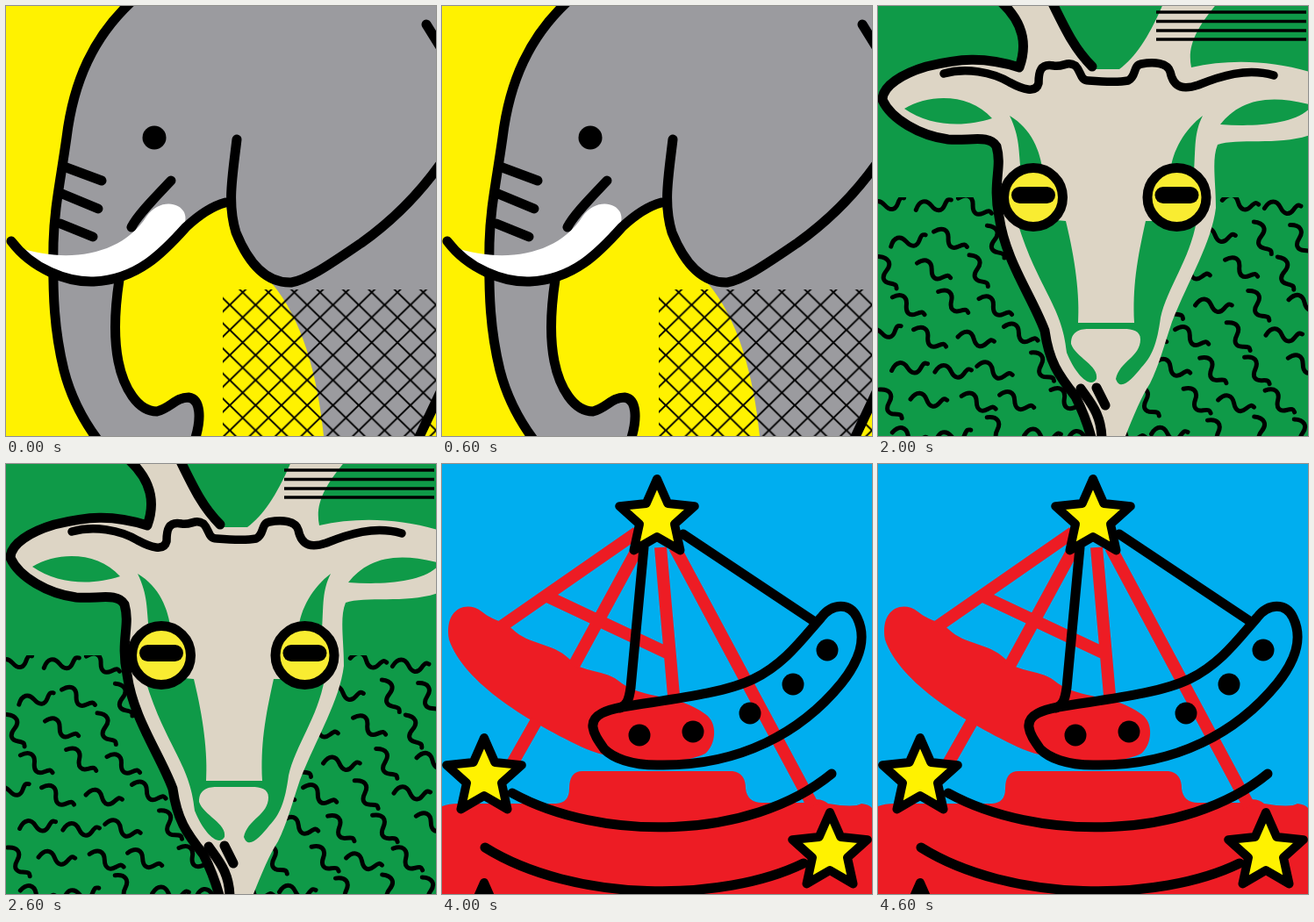
Animation of 490 by 490 pixels, one loop 5000 ms. Source, as an HTML page:

```html
<!DOCTYPE html>
<html lang="en">
<head>
<meta charset="utf-8">
<title>Animal posters</title>
<style>
html, body { margin: 0; width: 100%; height: 100%; overflow: hidden; }
svg { display: block; width: 100vw; height: 100vh; }
.scene { display: none; }
.scene.on { display: inline; }
.line { fill: none; stroke: #000; stroke-width: 11; stroke-linecap: round; stroke-linejoin: round; }
.red { fill: none; stroke: #ed1c24; stroke-width: 14; }
.navy { fill: none; stroke: #134c98; stroke-width: 27; stroke-linecap: round; }
</style>
</head>
<body>
<svg viewBox="0 0 490 490">
<defs>
  <path id="drop" d="M0 0C12 25 55 65 55 99A55 54 0 0 1-55 99C-55 65-12 25 0 0Z"/>
  <pattern id="mesh" x="255" y="312" width="29.4" height="28.6" patternUnits="userSpaceOnUse">
    <path d="M-2-2L31.4 30.6M31.4-2L-2 30.6" stroke="#000" stroke-width="2"/>
  </pattern>
  <pattern id="dots" x="291" y="291" width="17.6" height="17.6" patternUnits="userSpaceOnUse">
    <path d="M2 2h4.6v4.6h-4.6zM10.8 10.8h4.6v4.6h-4.6z"/>
  </pattern>
  <clipPath id="grass"><path d="M0 218H490V490H0Z"/></clipPath>
  <g id="eye">
    <circle r="33.5" fill="#f9ec31" stroke="#000" stroke-width="11"/>
    <rect x="-25" y="-12" width="50" height="19" rx="9.5"/>
  </g>
</defs>

<!-- Elephant -->
<g class="scene">
  <path fill="#fff200" d="M0 0H490V490H0Z"/>
  <path fill="#9b9b9f" d="M143-5C100 35 77 85 69 150C62 200 55 230 54 270C53 330 55 370 66 415C75 450 90 475 105 495H215C222 470 222 448 208 446C195 446 188 458 172 462C150 462 134 435 128 405C122 375 124 345 129 312L205 252C220 238 235 228 250 224C256 255 274 300 302 315C337 355 355 420 362 490H470L495 440V-5Z"/>
  <path fill="url(#mesh)" d="M247 323H490V490H247Z"/>
  <g class="line">
    <path d="M143-5C100 35 77 85 69 150C62 200 55 230 54 270C53 330 55 370 66 415C75 450 90 475 105 495"/>
    <path d="M129 312C124 345 122 375 128 405C134 435 150 462 172 462C188 458 193 446 208 446C222 448 223 470 215 495"/>
    <path d="M188 199C170 218 150 238 143 252M66 183L109 199M64 214L105 231M62 248L99 263"/>
    <path d="M263 152C258 195 252 225 262 258C275 290 295 316 325 315C345 312 375 290 405 270C440 245 470 215 495 180"/>
    <path d="M479 21L497 50M469 495L495 440"/>
  </g>
  <path fill="#fff" d="M14 275C70 294 132 284 160 240C173 221 196 222 203 235C208 247 200 255 190 262C160 295 125 312 90 310C55 305 30 292 14 275Z"/>
  <path class="line" d="M6 268C30 300 70 315 100 314C150 312 180 280 205 252C220 238 235 228 250 224"/>
  <circle cx="169" cy="150" r="13.5"/>
</g>

<!-- Frog -->
<g class="scene">
  <path fill="#bdbcc0" d="M0 0H490V490H0Z"/>
  <path class="line" d="M34-9V26M78-9V69M121-9V112"/>
  <use href="#drop" fill="#fff" transform="translate(361 -8) scale(2.16)"/>
  <use href="#drop" fill="#29a8e0" transform="translate(86 108)"/>
  <use href="#drop" fill="#29a8e0" transform="translate(55 293) scale(2.16)"/>
  <use href="#drop" fill="#00aeef" transform="translate(140 263) scale(.565)"/>
  <path fill="#39b54a" d="M202 250C225 225 260 212 295 212C340 212 380 245 445 255L444 262C437 295 418 318 400 333L372 352C366 360 376 370 386 362L408 345C420 336 427 340 427 352L425 380C427 390 439 390 440 380L439 350C440 334 448 334 456 336L478 343C490 344 492 330 482 328L464 320C435 305 450 280 495 262V495H146C130 465 120 440 124 405C130 375 160 355 190 366C212 375 224 405 218 440L211 474C210 486 225 488 229 478L235 442C238 432 248 432 256 440L278 466C284 474 295 470 293 460L268 430C262 422 262 416 270 412L300 403C310 398 308 386 298 387L270 393C255 396 240 394 228 382C208 360 203 330 207 300C210 280 213 270 206 259Z"/>
  <circle cx="300" cy="301" r="73" fill="url(#dots)"/>
  <path fill="#006838" d="M201 119C215 104 235 108 245 118C255 130 262 132 275 130C295 126 330 126 350 130C365 132 370 125 378 117C390 108 425 108 432 126C405 124 390 142 390 162C392 185 405 198 425 201C438 202 446 196 455 192C458 225 445 242 425 240C380 230 340 198 285 198C240 200 215 222 192 234C178 238 172 215 177 190Q188 196 203 194C230 191 238 175 238 158C238 140 225 124 201 119Z"/>
  <g class="line">
    <path d="M204 114C215 104 235 108 245 118C255 130 262 132 275 130C295 126 330 126 350 130C365 132 370 125 378 117C388 108 400 110 408 111"/>
    <path d="M176 197C172 215 178 238 192 234C215 222 240 200 285 198C340 198 380 230 425 240C445 242 458 225 453 194"/>
    <path d="M444 262C437 295 418 318 400 333L372 352C366 360 376 370 386 362L408 345C420 336 427 340 427 352L425 380C427 390 439 390 440 380L439 350C440 334 448 334 456 336L478 343C490 344 492 330 482 328L464 320C435 305 450 280 495 262"/>
    <path d="M206 259C213 270 210 280 207 300C203 330 208 360 228 382C240 394 255 396 270 393L298 387C308 386 310 398 300 403L270 412C262 416 262 422 268 430L293 460C295 470 284 474 278 466L256 440C248 432 238 432 235 442L229 478C225 488 210 486 211 474L218 440C224 405 212 375 190 366C160 355 130 375 124 405C120 440 130 465 146 495"/>
  </g>
  <ellipse cx="195" cy="155" rx="14" ry="19"/>
  <ellipse cx="434" cy="159" rx="14" ry="18"/>
</g>

<!-- Goat -->
<g class="scene">
  <path fill="#0f9a48" d="M0 0H490V490H0Z"/>
  <g clip-path="url(#grass)"><path id="squiggles" class="line" style="stroke-width:5"/></g>
  <path fill="#ddd5c5" d="M140-5C167 20 170 45 161 70C120 57 92 60 55 69C28 77 5 91 5 107C15 129 48 148 80 152C105 154 127 146 135 160C142 185 130 200 138 240C145 290 175 330 190 370C195 405 205 420 225 450C235 465 240 480 250 495H280C290 470 300 445 310 430C320 410 325 390 335 360C355 310 380 270 385 230C385 200 380 175 387 158C410 150 460 160 495 146V76C450 62 400 60 357 70C352 45 363 25 388-5H326C309 35 294 58 275 72H245C225 50 215 30 198-5Z"/>
  <g fill="#0f9a48">
    <path d="M30 117C60 99 105 100 130 128C100 138 60 138 30 117ZM390 135C410 110 440 98 495 113C480 135 430 138 390 135Z"/>
    <path d="M150 125C175 140 185 165 188 190H163C160 165 162 150 150 125ZM370 125C350 140 335 165 333 190H360C362 160 360 145 370 125Z"/>
    <path d="M157 240L214 245C225 290 230 330 228 361H292C290 320 295 290 305 245L363 245C355 290 330 320 322 355C318 385 312 400 300 412C290 425 276 440 271 425C275 405 299 400 299 380C299 370 290 368 280 368H240C228 368 220 372 220 385C225 400 252 410 249 425C242 437 225 420 215 395C210 340 180 320 157 240Z"/>
  </g>
  <g class="line">
    <path d="M140-5C167 20 170 45 161 70C120 57 92 60 55 69C28 77 5 91 5 107C15 129 48 148 80 152C105 154 127 146 135 160C142 185 130 200 138 240C145 290 175 330 190 370C195 405 205 420 225 445C235 465 240 480 244 495"/>
    <path d="M198-5C215 30 225 50 244 69M231 436C242 452 255 465 255 495M249 435L259 455"/>
    <path style="stroke-width:9.5" d="M75 77C100 70 130 75 150 87C165 95 180 100 183 88C183 75 185 65 200 68C212 70 215 62 225 68C232 75 230 85 240 85C265 87 275 87 285 85C295 80 290 68 300 66C315 63 330 65 333 75C337 95 350 95 365 90C390 80 420 70 451 79"/>
  </g>
  <path d="M317 7H488M317 17.5H488M317 28H488M317 38H488" stroke="#000" stroke-width="3.5"/>
  <use href="#eye" x="177" y="218"/>
  <use href="#eye" x="340.5" y="218"/>
</g>

<!-- Whale -->
<g class="scene">
  <path fill="#fff" d="M0 0H490V490H0Z"/>
  <g id="rings" fill="none" stroke-width="28"></g>
  <g class="navy">
    <path d="M48 305C58 370 100 410 150 411C200 409 242 375 243 330C243 300 225 265 202 252M287 252C265 265 244 300 247 330C255 380 295 409 335 408C380 407 430 375 441 310"/>
    <path d="M76 250C78 290 95 335 116 353M115 240C113 285 130 315 157 330M155 245C155 275 165 295 188 305"/>
    <path d="M336 243C336 270 325 290 315 303M375 228C378 280 362 308 345 328M412 250C413 300 395 335 374 352"/>
  </g>
  <path class="line" d="M134 405C182 470 285 469 350 433"/>
  <path d="M25 250C20 205 45 187 80 187C130 182 170 200 205 247L185 240C160 215 120 208 85 210C50 206 36 218 32 240Q28 252 25 250Z"/>
  <path d="M46 205C45 310 78 415 213 438C125 403 70 325 66 205ZM85 200C85 305 120 405 250 427C157 385 107 305 105 200ZM123 200C125 295 152 378 253 403C182 364 148 295 145 200ZM160 205C163 285 188 352 275 380C212 340 186 280 180 220ZM183 225C190 295 232 334 273 311C235 312 210 280 198 238Z"/>
  <path d="M125 173C185 183 255 217 313 272L272 297C252 306 232 296 232 280C234 270 245 266 242 258C226 228 185 193 125 173Z"/>
  <circle cx="254" cy="282" r="8" fill="#fff"/>
  <path d="M125 405C118 440 118 465 145 485C165 495 176 485 171 470C160 455 145 450 151 425Z"/>
  <path d="M303 312C300 294 320 285 335 294C344 304 330 307 328 318C345 370 355 400 354 430C366 455 367 480 385 490H320C325 465 318 440 321 410C329 370 325 338 316 318C312 309 320 306 326 303C315 299 309 303 303 312Z"/>
  <path d="M378 213C395 208 425 222 440 232C460 234 475 231 495 236V273C470 272 460 268 452 262C448 285 460 310 450 335C435 370 412 388 392 412C378 431 362 440 350 436L385 403C383 362 414 330 434 310C442 290 440 275 438 255C415 264 405 255 407 248C390 245 382 235 378 213Z"/>
</g>

<!-- Starry dish -->
<g class="scene">
  <path fill="#00aeef" d="M0 0H490V490H0Z"/>
  <path fill="#ed1c24" d="M8 200C2 165 28 155 45 168C60 180 70 178 80 188C100 207 125 203 145 222C160 240 185 232 205 250C230 268 270 262 300 285C315 295 312 320 300 330C270 345 200 340 165 325C100 295 25 250 8 200Z"/>
  <path fill="#ed1c24" d="M0 390Q8 387 18 387H130Q145 386 145 370Q145 350 160 350H331Q346 352 346 370Q348 386 365 386H412Q430 378 440 387Q470 392 478 387Q487 388 490 392V490H0Z"/>
  <path class="red" d="M222 78L65 187M222 98L150 230M249 95L265 275M265 95L423 390M118 150L256 215M108 292L75 350"/>
  <g class="line">
    <path d="M172 300C170 285 190 280 205 277C260 268 320 262 355 245C390 228 410 200 432 175C445 158 465 158 473 175C485 200 475 225 455 250C410 305 340 345 245 343C215 343 195 335 185 325C178 315 173 308 172 300Z"/>
    <path d="M230 95L215 255C213 270 210 275 203 278M275 80L425 180M80 375C180 430 350 430 444 353M49 437C150 500 320 500 412 455"/>
  </g>
  <circle cx="225" cy="309" r="12.5"/><circle cx="286" cy="305" r="12.5"/><circle cx="351" cy="284" r="12.5"/><circle cx="400" cy="251" r="12.5"/><circle cx="439" cy="212" r="12.5"/>
  <g id="stars" class="line" style="fill:#fff200;stroke-width:10"></g>
</g>
</svg>
<script>
const byId = id => document.getElementById(id);
const polar = (x, y, r, deg) => {
  const a = deg * Math.PI / 180;
  return `${(x + r * Math.cos(a)).toFixed(1)} ${(y - r * Math.sin(a)).toFixed(1)}`;
};

// Rainbow: radius, then colour, start and end angle of each piece
const blue = '#2394d3', orange = '#ec8023', green = '#6ab343', amber = '#fdb31b';
const rings = [
  [203, [blue, 189, 129], [blue, 52, -8], [orange, 129, 52]],
  [164.5, [green, 170, 91.5], [amber, 91.5, 7]],
  [125, [orange, 160, 129], [orange, 53, 21], [blue, 129, 53]],
  [88, [amber, 162, 92.5], [green, 92.5, 20]]
];
const arc = (r, from, to) => `M${polar(246, 241, r, from)}A${r} ${r} 0 0 1 ${polar(246, 241, r, to)}`;
byId('rings').innerHTML = rings.map(([r, ...parts]) => parts.map(([color, from, to]) => {
  const tip = [from, to].find(a => a > 135 || a < 45);
  const cap = tip === undefined ? '' :
    `<path stroke="${color}" stroke-linecap="round" d="M${polar(246, 241, r, tip)}h.01"/>`;
  return `<path stroke="${color}" d="${arc(r, from, to)}"/>${cap}`;
}).join('')).join('');

const star = (x, y) => {
  const points = Array.from({ length: 10 }, (_, i) => polar(x, y, i % 2 ? 21 : 45, 90 + i * 36));
  return `<path d="M${points.join('L')}Z"/>`;
};
byId('stars').innerHTML = star(245, 62) + star(48, 357) + star(442, 442) + star(48, 522);

// Scattered wavy blades
let seed = 11;
const rand = () => (seed = seed * 16807 % 2147483647) / 2147483647;
let blades = '';
for (let y = 228, row = 0; y < 500; y += 37, row++) {
  for (let x = row % 2 * 25 + 10; x < 500; x += 50) {
    const a = (rand() * 85 - 10) * Math.PI / 180, c = Math.cos(a), s = Math.sin(a);
    const px = x + rand() * 8 - 4, py = y + rand() * 8 - 4;
    const at = (u, v) => `${(px + u * c - v * s).toFixed(1)} ${(py + u * s + v * c).toFixed(1)} `;
    blades += `M${at(-20, 3)}C${at(-15, -8)}${at(-7, -8)}${at(-2, 0)}S${at(9, 8)}${at(13, 1)}S${at(18, -5)}${at(21, -4)}`;
  }
}
byId('squiggles').setAttribute('d', blades);

const scenes = document.querySelectorAll('.scene');
const start = performance.now();
function draw() {
  const current = Math.floor((performance.now() - start) / 1000) % scenes.length;
  scenes.forEach((scene, i) => scene.classList.toggle('on', i === current));
  requestAnimationFrame(draw);
}
draw();
</script>
</body>
</html>
```
